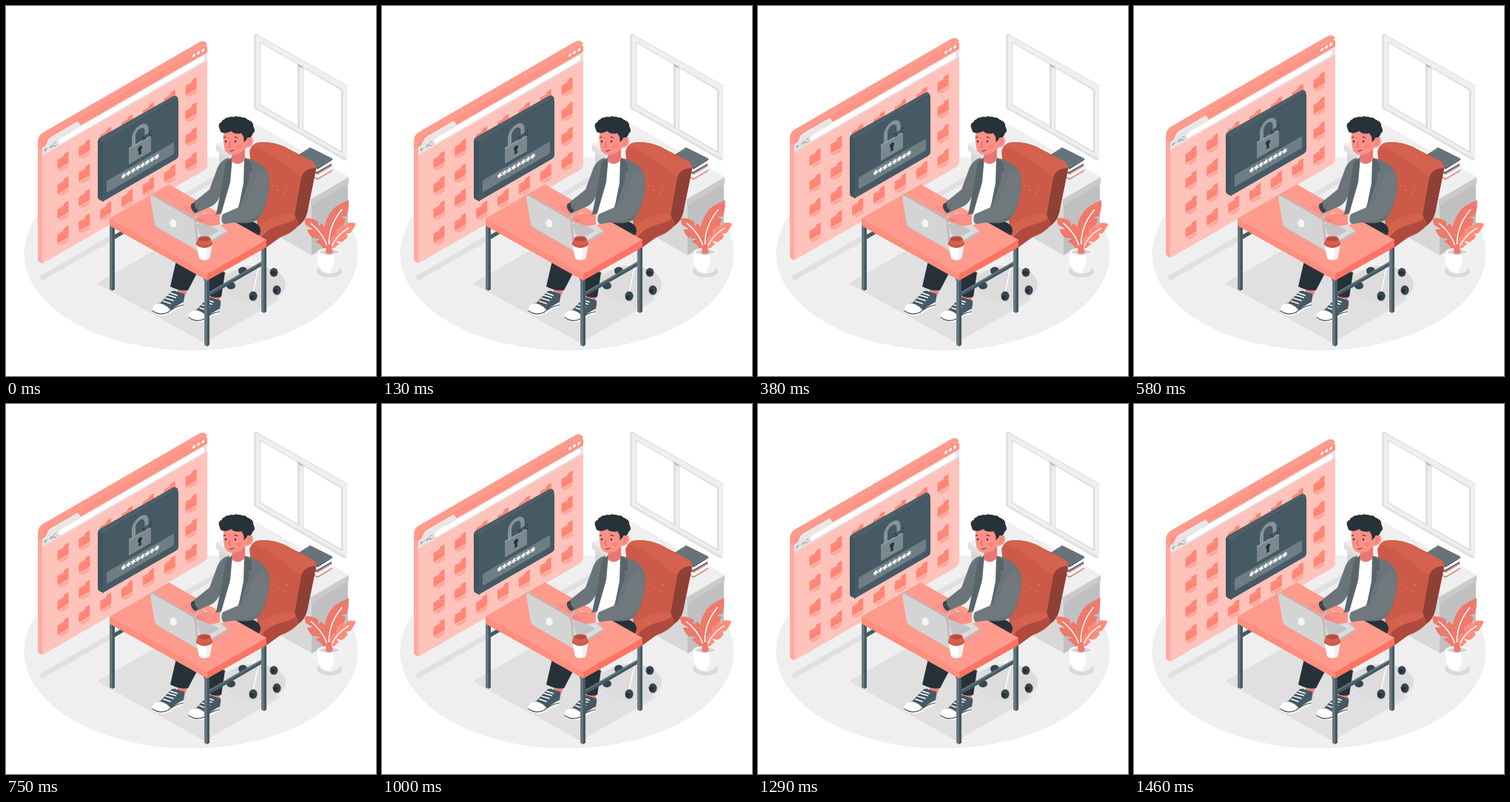
Recreate the animation shown at these times as an HTML page. Size 500x500 px, loop 1500 ms.

```html
<!DOCTYPE html>
<html lang="en">
<head>
<meta charset="utf-8">
<title>Locked files</title>
<style>
html, body { margin: 0; width: 100%; height: 100%; overflow: hidden; background: #fff; }
svg { display: block; width: 100vw; height: 100vh; }
.ln { fill: none; stroke-linecap: round; stroke-linejoin: round; }
</style>
</head>
<body>
<svg viewBox="0 0 500 500">
  <!-- floor and shadows -->
  <ellipse cx="250" cy="334.500" rx="225.500" ry="131" fill="#efefef"/>
  <path class="ln" d="M49 367L281 234" stroke="#e0e0e0" stroke-width="7"/>
  <path d="M123 375L218 320L370 397L268 455z" fill="#e0e0e0"/>
  <ellipse cx="336" cy="376" rx="42" ry="25" fill="#dcdcdc"/>
  <ellipse cx="437" cy="358" rx="17" ry="9" fill="#d9d9d9"/>

  <!-- window -->
  <g>
    <path d="M335 39L338 37.500L461 107V207L458 209L335 138z" fill="#e0e0e0"/>
    <path d="M338 39L461 108V207L338 137z" fill="#efefef"/>
    <path d="M343 48L394 78V163L343 134zM401 82L455 113V199L401 168z" fill="#dadada"/>
    <path d="M344 50L394 79V162L344 133zM402 84L453 114V196L402 167z" fill="#fff"/>
    <path d="M394 78L400 82V168L394 164z" fill="#dedede"/>
    <path d="M397 80L401 82V168L397 166z" fill="#efefef"/>
    <path d="M394 78L402 82L400 84L394 81z" fill="#bdbdbd"/>
  </g>

  <!-- cabinet -->
  <g>
    <path d="M288 195L413 268V337L288 265z" fill="#d8d8d8"/>
    <path d="M413 268L462 240V308L413 337z" fill="#c0c0c0"/>
    <path d="M284 187L412 261V270L284 196z" fill="#e0e0e0"/>
    <path d="M412 261L463 231V240L412 270z" fill="#cacaca"/>
    <path d="M335 158L463 231L412 261L284 187z" fill="#efefef"/>
    <path d="M413 224L421 218L441 216V222L421 234L413 230z" fill="#f5f5f5"/>
    <path d="M414 229L421 233L441 221V223L421 235L414 231z" fill="#d98a80"/>
    <path d="M415 222L421 226L440 214L441 216L421 228L415 224z" fill="#d98a80"/>
    <path d="M396 206L420 221L439 209V214L420 226L394 211z" fill="#f2f2f2"/>
    <path d="M392 203L411 191L441 206L421 218z" fill="#66737a"/>
    <path d="M392 203L421 218L441 206V208L421 220.500L393 205z" fill="#455a64"/>
    <path d="M392 204L395 206V211L420 224.500L440 213V214.500L420 226.500L392 211z" fill="#455a64"/>
  </g>

  <!-- floating browser -->
  <g id="browser">
    <path d="M43 190V184Q43 175 50 171L261 49Q266 46 270 49L272 52L49 188V348L43 344z" fill="#ff9b8c"/>
    <path d="M43 190L49 194V348L43 344z" fill="#ffaa9d"/>
    <g transform="matrix(1 -.577 0 1 49 180.300)">
      <path d="M0 7Q0 0 6 0H218Q223 0 223 6V163Q223 168 217 168H0z" fill="#ffc3bb"/>
      <path d="M0 7Q0 0 6 0H218Q223 0 223 6V11H0z" fill="#ff9485"/>
      <path d="M1 11.500Q6 11 7 6Q8 3 12 3H46Q49 3 50 7Q51 11 54 11.500z" fill="#ebe6e5"/>
      <path d="M0 11H223V22H0z" fill="#e6e4e4"/>
      <rect x="22" y="12.500" width="197" height="7.500" rx="3.700" fill="#fff"/>
      <g fill="#fff"><circle cx="205" cy="4.800" r="2"/><circle cx="211" cy="4.800" r="2"/><circle cx="217" cy="4.800" r="2"/></g>
      <path class="ln" d="M7 16.500H3M4.500 14.500L3 16.500L4.500 18.500M9.500 16.500H13.500M12 14.500L13.500 16.500L12 18.500M19 15A2.200 2.500 0 1 0 19.400 17.500" stroke="#8d8d8d" stroke-width=".8"/>
      <g id="folders"></g>
    </g>
    <!-- lock panel -->
    <g transform="translate(0 .8)">
      <path d="M124 183Q124 179 127 177L226 121Q229 120 231 122L233 125L132 186V264L126 261Q124 260 124 257z" fill="#41545d"/>
      <path d="M125 179L227 121Q230 120 232 123L130 184z" fill="#4d5f68"/>
      <g transform="matrix(1 -.577 0 1 130 184)">
        <rect width="103" height="80" rx="3" fill="#455a64"/>
        <rect x="6" y="55" width="91" height="16" rx="2" fill="#6f7d85"/>
        <path class="ln" d="M42.500 29V17A8.700 9 0 0 1 60 17V23" stroke="#87939a" stroke-width="5" style="stroke-linecap:butt"/>
        <path d="M36 28H66V50H36z" fill="#7b888f"/>
        <path d="M36 28H66V30H36z" fill="#939ea4"/>
        <circle cx="51" cy="37" r="3" fill="#263238"/>
        <path d="M50 37H52L53 45H49z" fill="#263238"/>
        <path class="ln" d="M54 24L57 26M55 28H59M63 25L67 22M64 28L68 29" stroke="#263238" stroke-width="1"/>
        <path id="stars" class="ln" stroke="#fff" stroke-width="1.500"/>
      </g>
    </g>
  </g>

  <!-- chair -->
  <g>
    <path class="ln" d="M342 328V354M342 354L322 356M342 352L364 361M340 354L333 388M342 354L366 381" stroke="#d9d9d9" stroke-width="4"/>
    <path class="ln" d="M342 328V354M341 354L334 386" stroke="#f7f7f7" stroke-width="2"/>
    <g fill="#37474f">
      <ellipse cx="320" cy="358" rx="6" ry="5.500"/><ellipse cx="362" cy="360" rx="5.500" ry="6"/>
      <ellipse cx="334" cy="392" rx="5.500" ry="6.500"/><ellipse cx="366" cy="384" rx="5.500" ry="6.500"/>
      <ellipse cx="304" cy="378" rx="6" ry="5"/>
    </g>
    <g fill="#263238"><circle cx="332" cy="394" r="3"/><circle cx="364" cy="385" r="3"/><circle cx="361" cy="361" r="3"/></g>
    <path d="M329 197Q332 184 345 184Q360 183 376 190L414 210Q421 213 419 222L407 279Q404 291 395 297L360 314Q343 331 342 318z" fill="#cd5a49"/>
    <path d="M419 219Q404 219 399 232L391 277Q389 286 392 291L395 297Q404 291 407 279z" fill="#8f4034"/>
    <path d="M333 190Q337 184 345 184Q360 183 376 190L414 210Q420 213 419 219Q404 218 398 230Q378 216 352 198Q342 191 333 190z" fill="#d5614f"/>
    <path d="M342 296Q359 286 379 284Q391 282 395 291V297Q388 306 370 313L352 326Q346 330 342 326z" fill="#b04a3c"/>
    <path d="M342 294Q360 285 380 281Q391 280 392 287Q388 292 370 296Q356 300 348 309L342 317z" fill="#d5614f"/>
    <g fill="#e07868"><circle cx="361" cy="243" r="1"/><circle cx="367" cy="249" r="1"/><circle cx="376" cy="252" r="1"/><circle cx="380" cy="244" r="1"/></g>
  </g>

  <!-- legs and shoes -->
  <g>
    <path d="M234 377L247 380L241 394L231 389zM276 386L290 390L287 402L275 398z" fill="#e98077"/>
    <path d="M231 340L264 350L246 384Q234 386 222 379zM263 350L296 360L291 393Q282 396 272 390z" fill="#263238"/>
    <path d="M304 291Q325 283 341 296Q347 304 341 311L328 308z" fill="#263238"/>
    <g id="shoe">
      <path d="M199 411Q198 404 209 401L222 387Q226 383 231 386L238 388Q242 387 241 394L239 406Q228 407 220 416Q210 420 199 411z" fill="#455a64"/>
      <path d="M198 409Q199 402 209 402Q219 405 223 412Q226 407 240 400L239 407Q229 409 221 416Q210 421 200 415Q197 413 198 409z" fill="#fff"/>
      <path class="ln" d="M198 412Q208 419 219 414Q226 407 239 404" stroke="#37474f" stroke-width="1.100"/>
      <path class="ln" d="M213 399L222 402M216 395L226 398M219 391L229 394M222 388L231 391" stroke="#fff" stroke-width="1.800"/>
    </g>
    <use href="#shoe" x="49" y="9"/>
  </g>

  <!-- desk -->
  <g>
    <path d="M147 309L188 286V291L147 315z" fill="#455a64"/>
    <path d="M275 386L346 345V351L275 392z" fill="#455a64"/>
    <path d="M275 386L346 345V347L275 388z" fill="#6a787f"/>
    <g id="leg">
      <path d="M140 293L144 295V385L140 383z" fill="#6a787f"/>
      <path d="M143.500 295L147 293V383L143.500 385z" fill="#455a64"/>
    </g>
    <use href="#leg" x="128" y="75"/>
    <use href="#leg" x="205" y="30"/>
    <path d="M140 287L272 361V371L140 297z" fill="#ff8e7e"/>
    <path d="M272 361L352 316V326L272 371z" fill="#ff7362"/>
    <path d="M220 241L352 316L272 362L140 287z" fill="#ff9b8c"/>
  </g>

  <!-- laptop base -->
  <path d="M255 283L271 280L299 304V307L260 330L250 324z" fill="#bdbdbd"/>
  <path d="M250 290L270 279L299 304L260 327z" fill="#dcdcdc"/>
  <path d="M257 295L266 290L288 304L265 317z" fill="#c4c4c4"/>

  <!-- upper body -->
  <g>
    <path d="M302 205L322 205L333 216L325 284Q308 290 286 280z" fill="#fff"/>
    <path d="M236 272Q246 269 257 268L263 277L253 283Q247 278 236 272z" fill="#fc8f86"/>
    <path d="M302 205Q291 207 286 218L275 248L250 268Q250 276 256 280L279 270Q286 265 289 257L286 279L282 283L290 281L300 245z" fill="#6b7579"/>
    <path d="M250 268Q249 276 256 280L260 276Q254 273 255 266z" fill="#37474f"/>
    <path d="M306 204L297 211L292 243L284 281L291 280L303 238z" fill="#58646a"/>
    <path d="M322 205Q337 208 347 216Q357 226 356 242Q353 272 340 289Q327 296 306 292L322 250z" fill="#6b7579"/>
    <path d="M322 205L331 211L333 223L328 226L329 233L313 279L321 239z" fill="#58646a"/>
    <path class="ln" d="M337 239L330 266L316 272" stroke="#4b585e" stroke-width="1"/>
    <path d="M343 224Q358 228 355 245Q351 272 338 284Q330 290 291 295Q286 292 289 283L319 270Q329 261 332 242z" fill="#70797d"/>
    <path d="M289 283L293 281Q289 289 294 295L290 296Q286 290 289 283z" fill="#eee"/>
    <path d="M289 284L274 281Q264 280 257 286Q253 291 260 292L266 293Q274 300 289 295z" fill="#fc8f86"/>
    <path class="ln" d="M258 288L266 288M261 291L269 290" stroke="#e4716a" stroke-width=".8"/>
    <path d="M305 194L323 188L323 208Q315 217 306 211z" fill="#ea7672"/>
    <path d="M294 169Q293 185 296 195Q300 202 309 201Q319 199 323 192Q334 191 334 182Q333 175 326 177L324 164L299 163z" fill="#fc8f86"/>
    <path d="M290 170Q286 162 292 159Q290 152 299 153Q303 147 310 151Q317 147 322 153Q331 152 331 160Q338 163 333 170Q334 176 329 178Q326 176 325 181L321 184Q323 178 318 172Q309 174 304 169Q296 174 290 170z" fill="#263238"/>
    <g fill="#263238"><circle cx="293" cy="162" r="5.500"/><circle cx="300" cy="156" r="5.500"/><circle cx="311" cy="155" r="6"/><circle cx="321" cy="156" r="5.500"/><circle cx="328" cy="161" r="6"/><circle cx="331" cy="168" r="5"/><ellipse cx="297" cy="183" rx="1.100" ry="1.600"/><ellipse cx="310" cy="183" rx="1.100" ry="1.600"/></g>
    <path class="ln" d="M294 178L297 177M309 177L313 178M303 196Q306 197 308 194.500" stroke="#263238" stroke-width="1"/>
    <path class="ln" d="M303 183L301 190L304 190.500M329 181Q331 183 327 187" stroke="#dc625c" stroke-width=".9"/>
    <ellipse cx="315" cy="190" rx="3.500" ry="2.500" fill="#f9776f" opacity=".6"/>
  </g>

  <!-- laptop lid and cup -->
  <path d="M195 257Q195 253 199 255L253 286Q256 288 257 292L261 329L258 330L207 301Q202 298 201 294z" fill="#b8b8b8"/>
  <path d="M195 258Q196 255 199 257L251 287Q254 289 255 293L258 330L206 300Q202 298 201 294z" fill="#d4d4d4"/>
  <ellipse cx="226" cy="294" rx="4.500" ry="5.500" fill="#f5f5f5" transform="rotate(-18 226 294)"/>
  <path d="M257 322H279L275 341Q268 346 261 341z" fill="#fff"/>
  <path d="M272 326L279 322L275 341L270 343z" fill="#f0f0f0"/>
  <path d="M257 319Q268 312 279 319V323Q268 331 257 323z" fill="#cd5a49"/>
  <path d="M259 315Q260 311 268 311Q276 311 277 315L278 320Q268 326 258 320z" fill="#d5614f"/>
  <ellipse cx="268" cy="315" rx="8" ry="3.300" fill="#b94c3d"/>

  <!-- plant -->
  <g id="leaves">
    <path d="M434 331Q427 309 432 292Q437 278 446 271Q454 266 463 262Q464 275 460 284L453 285L459 288Q457 296 453 301L446 301L450 305Q442 318 440 332z" fill="#ee7a6b"/>
    <path d="M432 332Q427 323 418 318L425 315L414 313Q409 309 407 302L415 302L405 296Q404 292 403 287Q415 286 422 292L422 298L426 294Q433 299 434 307L431 312L436 311Q440 321 440 332z" fill="#ee7a6b"/>
    <path d="M435 332Q437 316 443 309L446 312L446 304Q451 296 458 295L456 300L462 293Q467 292 473 294Q470 301 465 307L458 307L462 311Q458 317 453 319L446 317L450 322Q444 325 441 332z" fill="#ff8b7b"/>
    <path class="ln" d="M437 331Q433 300 454 275M436 331Q430 308 412 294M438 331Q444 311 463 300" stroke="#fff" stroke-width="1.500"/>
  </g>
  <path d="M421 332H453Q455 348 449 358Q437 365 426 358Q419 347 421 332z" fill="#fff"/>
  <path d="M443 334H453Q455 348 449 358Q443 362 437 361Q445 350 443 334z" fill="#f0f0f0"/>
  <ellipse cx="437" cy="332" rx="16" ry="5" fill="#f5f5f5"/>
  <ellipse cx="437" cy="332.500" rx="12.500" ry="3.300" fill="#d5d5d5"/>
  <path d="M432 334Q432 326 434 322H440Q440 328 442 333Q437 337 432 334z" fill="#ee7a6b"/>
</svg>
<script>
const $ = id => document.getElementById(id);
const LOOP = 1500, RISE = 9, SWAY = 0.8;

function folder(x, y) {
  return `<g transform="translate(${x} ${y})">
    <path d="M-7.500 -5.500H0L2 -8.500H7.500V7H-7.500z" fill="#ff8575"/>
    <path d="M-7.500 -3H7.500" stroke="#ff9a8b" stroke-width=".6"/>
    <path d="M-6.500 9H7.500M-3 11.500H7.500" stroke="#ff8575" stroke-width="1"/></g>`;
}

let icons = "";
for (let row = 0; row < 4; row++)
  for (let col = 0; col < 7; col++) icons += folder(28 + col * 28.85, 45 + row * 33.5);
$("folders").innerHTML = icons;

let marks = "";
for (let i = 0; i < 8; i++) {
  const x = 29 + i * 6.4;
  for (let k = 0; k < 3; k++) {
    const a = Math.PI * (k / 3 + 0.5), dx = 2.7 * Math.cos(a), dy = 2.7 * Math.sin(a);
    marks += `M${x - dx} ${61.5 - dy}L${x + dx} ${61.5 + dy}`;
  }
}
$("stars").setAttribute("d", marks);

function draw(now) {
  const a = (now % LOOP) / LOOP * 2 * Math.PI;
  const y = -RISE * (1 - Math.cos(a)) / 2;
  $("browser").setAttribute("transform", `translate(0 ${y.toFixed(3)})`);
  $("leaves").setAttribute("transform", `rotate(${(SWAY * Math.sin(a)).toFixed(3)} 437 332)`);
}

const start = performance.now();
function tick() {
  draw(performance.now() - start);
  requestAnimationFrame(tick);
}
draw(0);
requestAnimationFrame(tick);
</script>
</body>
</html>
```
